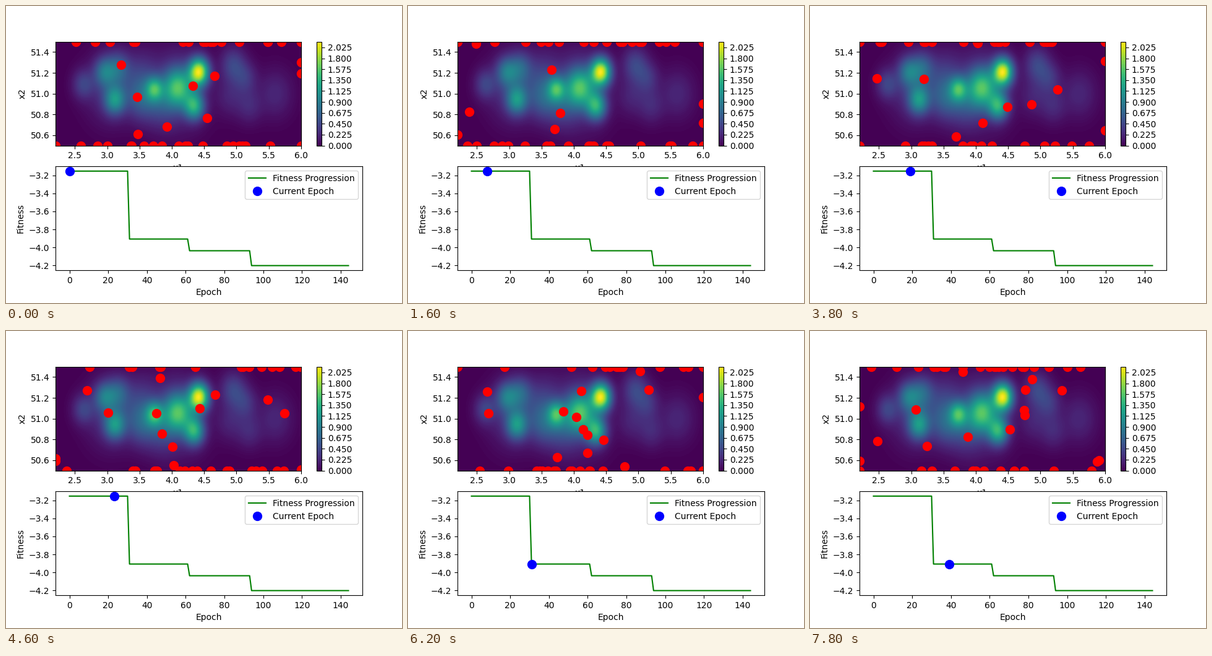
These frames come from a looping animation (640 px wide and 480 px high, 8 s). A matplotlib script:

```python
import numpy as np
import matplotlib.pyplot as plt
from matplotlib.animation import FuncAnimation

FRAMES, STEP_MS = 40, 200
X0, X1, Y0, Y1 = 2.2, 6.0, 50.5, 51.5
PARTICLES = 50
LEVEL_STEP, LEVELS = 0.015, 144

# Density bumps: x, y, height, radius
BUMPS = [
    (4.42, 51.21, 1.92, 0.105),
    (3.73, 51.045, 0.9, 0.09),
    (4.1, 51.06, 1.2, 0.15),
    (4.35, 50.88, 1.15, 0.105),
    (3.12, 50.94, 0.9, 0.11),
    (2.96, 51.21, 0.65, 0.11),
    (3.17, 51.25, 0.5, 0.12),
    (2.63, 51.09, 0.38, 0.11),
    (3.05, 51.05, 0.3, 0.25),
    (3.52, 50.95, 0.45, 0.16),
    (3.82, 50.92, 0.35, 0.18),
    (3.52, 51.18, 0.28, 0.18),
    (4.07, 51.04, 0.3, 0.3),
    (4.95, 51.28, 0.42, 0.13),
    (5.14, 51.15, 0.3, 0.12),
    (5.2, 50.88, 0.22, 0.13),
    (4.91, 50.98, 0.2, 0.15),
    (5.6, 51.0, 0.22, 0.18),
]


def density(x, y):
    z = sum(h * np.exp(-((x - cx) / r) ** 2 / 2 - ((y - cy) / (0.87 * r)) ** 2 / 2)
            for cx, cy, h, r in BUMPS)
    return z * 2.14 / z.max()


def swarm(epoch):
    """Particles flung far out and clamped to the search box."""
    rng = np.random.default_rng(100 + epoch)
    x = np.clip(rng.normal(4.2, 1.2, PARTICLES), X0, X1)
    y = np.clip(rng.normal(51, 1.8, PARTICLES), Y0, Y1)
    return x, y


epochs = np.arange(145)
fitness = np.select([epochs <= 30, epochs <= 61, epochs <= 93],
                    [-3.153, -3.907, -4.037], -4.202)

fig, (ax_map, ax_fit) = plt.subplots(2, 1, figsize=(6.4, 4.8), dpi=100)

gx, gy = np.meshgrid(np.linspace(X0, X1, 140), np.linspace(Y0, Y1, 90))
fill = ax_map.contourf(gx, gy, density(gx, gy), cmap="viridis",
                       levels=np.arange(LEVELS) * LEVEL_STEP)
bar = fig.colorbar(fill, ax=ax_map)
bar.set_ticks(np.arange(0, LEVELS, 15) * LEVEL_STEP)
bar.ax.yaxis.set_major_formatter("{x:.3f}")
particles, = ax_map.plot([], [], "ro", markersize=10)
ax_map.set(xlim=(X0, X1), ylim=(Y0, Y1), xlabel="x1", ylabel="x2")

ax_fit.plot(epochs, fitness, "g-", label="Fitness Progression")
marker, = ax_fit.plot([0], [fitness[0]], "bo", markersize=10, label="Current Epoch")
ax_fit.set(xlabel="Epoch", ylabel="Fitness")
ax_fit.legend(loc="upper right")


def update(n):
    particles.set_data(*swarm(n))
    marker.set_data([n], [fitness[n]])
    return particles, marker


anim = FuncAnimation(fig, update, frames=FRAMES, interval=STEP_MS,
                     repeat=True, repeat_delay=0, blit=False)
plt.show()
```
